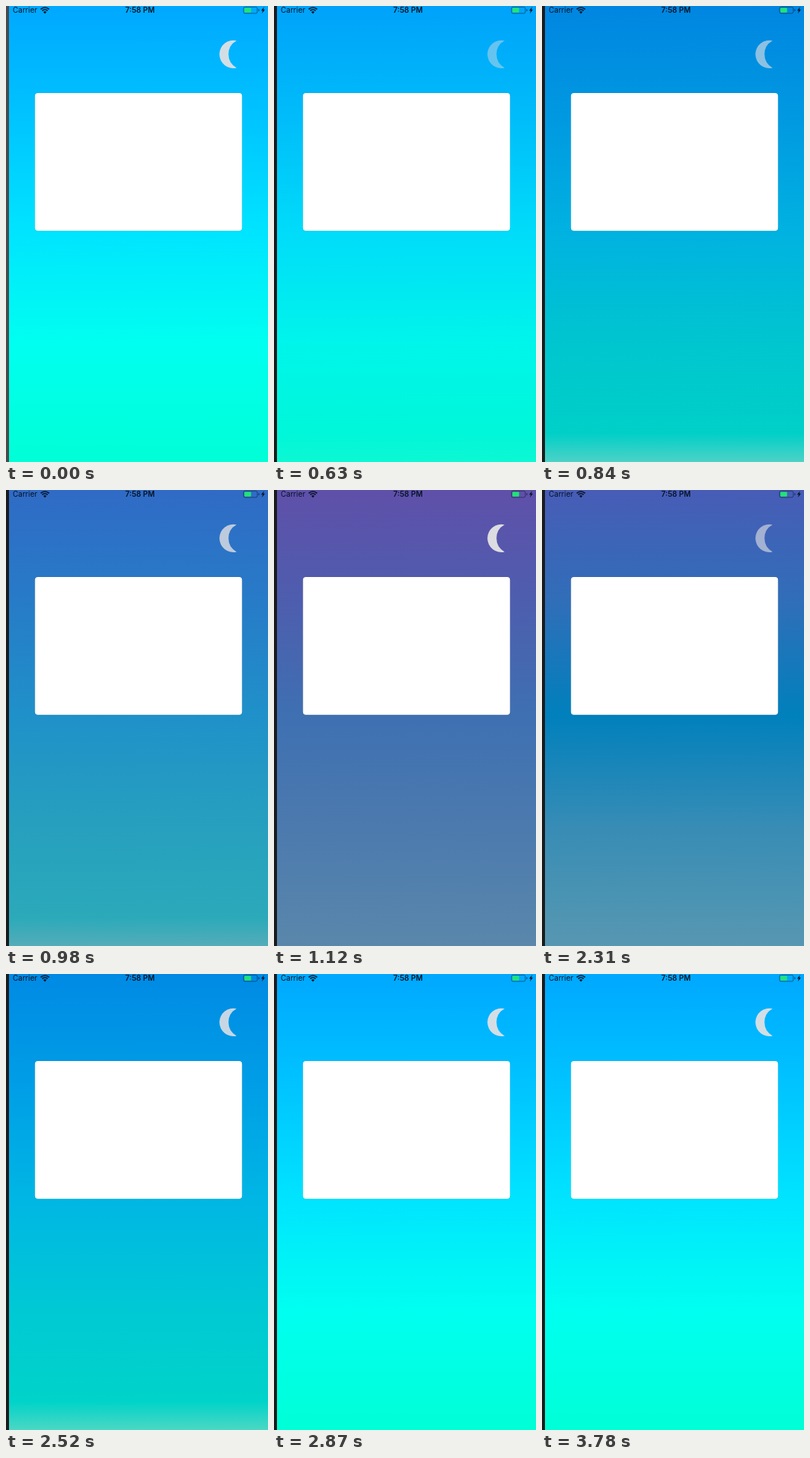
Write an HTML page that moves like this. It is 350 px wide and 608 px high and loops after 3850 ms.

```html
<!DOCTYPE html>
<html lang="en">
<head>
<meta charset="utf-8">
<title>Day and night</title>
<style>
  html, body { margin: 0; width: 100%; height: 100%; overflow: hidden; background: #1b1b1b; }
  svg { display: block; width: 350px; height: 608px; }
  text { font-family: Inter, Roboto, sans-serif; font-size: 10px; }
  .ink { fill: #071426; }
  .line { fill: none; stroke: #071426; }
</style>
</head>
<body>
<svg viewBox="0 0 350 608">
  <defs>
    <linearGradient id="sky" gradientUnits="userSpaceOnUse" x1="0" y1="0" x2="0" y2="608"></linearGradient>
  </defs>
  <rect width="350" height="608" fill="url(#sky)"/>
  <rect id="edge" width="4" height="608" fill="#1b1b1b"/>

  <g class="ink">
    <text x="9" y="9.3">Carrier</text>
    <text x="179" y="9.4" text-anchor="middle" font-weight="600">7:58 PM</text>
    <path d="M52 10.2 L49.9 8 A3 3 0 0 1 54.1 8 Z"/>
    <path d="M345 1 L340.8 6.2 H343 L341.8 10 L346 4.8 H343.7 Z"/>
    <path d="M337 4 A1.6 1.6 0 0 1 337 7.2 Z" opacity=".5"/>
  </g>
  <g class="line">
    <path d="M48.4 6.4 A5.2 5.2 0 0 1 55.6 6.4 M46.4 4.3 A8 8 0 0 1 57.6 4.3" stroke-width="1.7"/>
    <rect x="317.3" y="1.4" width="18.4" height="8.4" rx="2" stroke-width=".9" opacity=".55"/>
  </g>
  <rect x="318.4" y="2.5" width="9" height="6.2" rx="1" fill="#22e278"/>

  <path id="moon" fill="#e2e1e3" d="M308 46.2 A18.6 18.6 0 1 0 308 82.4 A20.6 20.6 0 0 1 308 46.2 Z"/>
  <rect x="38" y="115.6" width="278" height="185" rx="4.5" fill="#000" opacity=".08"/>
  <rect x="38.7" y="116" width="276.6" height="183.8" rx="4" fill="#fff"/>
</svg>
<script>
  const LOOP = 3850;
  const $ = id => document.getElementById(id);

  // Sky colours from top to bottom at each of these heights
  const heights = [0, 150, 300, 450, 570, 608];
  const skies = {
    day:   ["#00a8ff", "#00c4ff", "#00e4ff", "#00fff0", "#00ffdc", "#00ffd6"],
    dusk:  ["#0086e1", "#0099e1", "#00b2e1", "#00c6cf", "#00d0c8", "#4dd2c6"],
    late:  ["#5f50aa", "#4d5eae", "#3e70b2", "#4c7aae", "#5684ac", "#5a87aa"],
    night: ["#803a94", "#784496", "#6c559e", "#5f62a2", "#5a69a8", "#596ba9"],
    early: ["#485cb6", "#306eb8", "#0080bc", "#388cb5", "#5095b2", "#5896b2"],
    dawn:  ["#008ae4", "#009ee6", "#00b6e4", "#00c9d4", "#00d3c9", "#4cd7c3"]
  };

  const skySteps = [
    [0, "day"], [520, "day", "cubic-bezier(.4, 0, .8, .8)"],
    [840, "dusk"], [1120, "late"], [1270, "night"],
    [1990, "night", "cubic-bezier(.4, 0, .8, .8)"],
    [2310, "early"], [2520, "dawn", "cubic-bezier(.2, .3, .6, 1)"],
    [2800, "day"], [LOOP, "day"]
  ];
  const moonSteps = [
    [0, .94], [520, .94], [630, .45], [840, .62], [1120, .97], [1990, .97],
    [2100, .45], [2310, .62], [2520, .88], [2700, .94], [LOOP, .94]
  ];
  const edgeSteps = [[0, "#4a4a4a", "steps(1, end)"], [560, "#1b1b1b"], [LOOP, "#1b1b1b"]];

  function play(el, prop, steps, value = v => v) {
    const frames = steps.map(([t, v, easing = "linear"]) =>
      ({ offset: t / LOOP, [prop]: value(v), easing }));
    const anim = el.animate(frames, { duration: LOOP, iterations: Infinity });
    anim.startTime = 0;
    return anim;
  }

  const anims = heights.map((y, i) => {
    const stop = document.createElementNS("http://www.w3.org/2000/svg", "stop");
    stop.setAttribute("offset", y / 608);
    $("sky").append(stop);
    return play(stop, "stopColor", skySteps, name => skies[name][i]);
  });
  anims.push(play($("moon"), "opacity", moonSteps), play($("edge"), "fill", edgeSteps));

  const start = document.timeline.currentTime || 0;
  anims.forEach(a => a.startTime = start);
</script>
</body>
</html>
```
